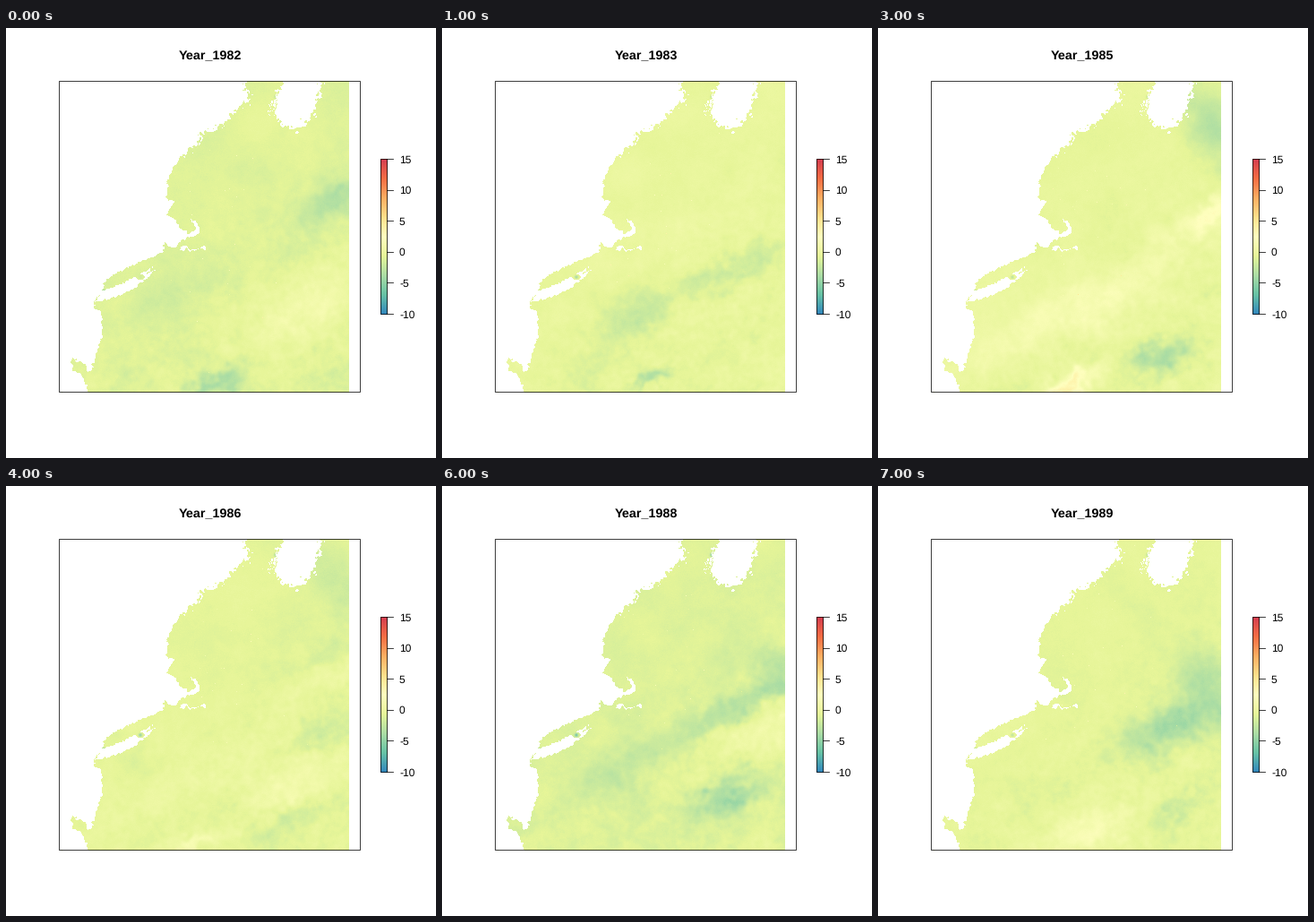
Recreate the animation shown at these times as a matplotlib script. Size 480x480 px, loop 8 s.

```python
import numpy as np
import matplotlib.pyplot as plt
from matplotlib.animation import FuncAnimation
from matplotlib.colors import LinearSegmentedColormap
from matplotlib.patches import Rectangle
from matplotlib.path import Path

plt.rcParams.update({"font.family": "Liberation Sans", "text.hinting": "none"})
PX = 0.72         # one pixel in points at 100 dpi
LINE = 0.75 * PX
X0, X1, Y0, Y1 = 59, 383, 59, 407
W, H = X1 - X0, Y1 - Y0
GX, GY = np.meshgrid(np.arange(X0, X1) + 0.5, np.arange(Y0, Y1) + 0.5)

CMAP = LinearSegmentedColormap.from_list("heat", [
    "#3288BD", "#66C2A5", "#ABDDA4", "#E6F598", "#FFFFBF",
    "#FEE08B", "#FDAE61", "#F46D43", "#D53E4F"], 256)
VMIN, VMAX = -10, 15
FIRST, COUNT = 1982, 8


def smooth(rng, scale):
    """Gaussian-filtered noise with unit deviation."""
    fy = np.fft.fftfreq(H)[:, None]
    fx = np.fft.rfftfreq(W)[None, :]
    gain = np.exp(-2 * (np.pi * scale) ** 2 * (fx ** 2 + fy ** 2))
    out = np.fft.irfft2(np.fft.rfft2(rng.normal(size=(H, W))) * gain, s=(H, W))
    return (out - out.mean()) / out.std()


# Key points of the shores; noise adds the ragged detail.
MAINLAND = [
    (50, 50), (262, 50), (270, 70), (270, 82), (240, 109), (222, 119),
    (193, 146), (181, 166), (179, 190), (188, 194), (179, 209), (188, 213),
    (194, 224), (204, 229), (213, 225), (205, 213), (214, 218), (217, 229),
    (197, 236), (188, 245), (176, 240), (175, 250), (140, 265), (112, 281),
    (107, 294), (98, 305), (98, 313), (107, 317), (107, 345), (95, 382),
    (91, 384), (88, 374), (73, 369), (74, 381), (86, 388), (92, 408),
    (50, 408)]
LONG_ISLE = [(99, 306), (107, 294), (130, 285), (163, 267), (156, 276),
             (167, 270), (143, 291), (126, 299)]
ISLANDS = [(193, 248), (198, 243), (206, 247), (213, 247), (222, 243),
           (222, 247), (207, 248)]
EAST = [(311, 50), (309, 60), (299, 88), (305, 106), (322, 115), (335, 104),
        (347, 88), (356, 50)]
NECK = [(293, 95), (303, 71), (304, 72), (295, 94)]
INLETS = [(150, 278), (109, 294), (301, 77)]


def sea_mask():
    rng = np.random.default_rng(4)
    rough = 0.7 + 1.8 / (1 + np.exp((GY - 150) / 8))
    pts = np.column_stack([(g + rough * smooth(rng, 1)).ravel()
                           for g in (GX, GY)])
    land = np.zeros(W * H, bool)
    for shore in (MAINLAND, LONG_ISLE, ISLANDS, EAST, NECK):
        land |= Path(shore).contains_points(pts)
    land = land.reshape(H, W)
    px, py = INLETS[0]
    return ~land | (np.hypot((GX - px) / 5, (GY - py) / 3) < 1)


SEA = sea_mask()
# Texture grows stronger away from the coast.
OFFSHORE = 0.3 + 1 / (1 + np.exp(-((GX - 260) * 0.6 + (GY - 240) * 0.8) / 30))
TILT = np.radians(25)  # the currents run up to the right

# Per year: base level, then main streaks (x, y, length, width, strength).
YEARS = {}
YEARS[1982] = -0.9, [(368, 190, 28, 13, -2.5), (335, 310, 55, 30, 1.8),
                     (225, 401, 26, 8, -3), (200, 290, 50, 20, -0.8)]
YEARS[1983] = -0.2, [(210, 317, 26, 15, -1.8), (315, 275, 52, 13, -1.9),
                     (237, 391, 18, 6, -3), (165, 383, 28, 18, -1.3)]
YEARS[1985] = -0.3, [(372, 108, 20, 36, -2.8), (368, 210, 28, 10, 3.2),
                     (225, 312, 95, 22, 1.8), (210, 401, 26, 8, 4),
                     (318, 368, 24, 12, -3.5)]
YEARS[1987] = -0.9, [(365, 195, 18, 26, -2), (355, 277, 30, 13, -3),
                     (325, 335, 46, 22, 3.2), (200, 303, 55, 20, -0.9)]
YEARS[1988] = -1.0, [(374, 205, 16, 15, -2.5), (325, 248, 55, 9, -2.2),
                     (195, 318, 42, 14, -1.4), (320, 348, 36, 12, -3),
                     (350, 275, 50, 18, 1.6)]
YEARS[1989] = -0.5, [(322, 275, 38, 15, -3.5), (370, 228, 24, 36, -2.9),
                     (240, 383, 42, 16, 2.2), (340, 355, 28, 7, -1.6)]


def pattern(year, x, y):
    base, streaks = YEARS[year]
    out = np.full_like(x, base)
    c, s = np.cos(TILT), np.sin(TILT)
    for sx, sy, length, width, strength in streaks:
        u = ((x - sx) * c - (y - sy) * s) / length
        v = ((x - sx) * s + (y - sy) * c) / width
        out += strength * np.exp(-(u * u + v * v) / 2)
    return out


def anomaly(year):
    rng = np.random.default_rng(year)
    x, y = (g + OFFSHORE * (3 * smooth(rng, 9) + 2 * smooth(rng, 2.5))
            for g in (GX, GY))
    # a year without its own pattern blends its neighbours
    parts = [year] if year in YEARS else [year - 1, year + 1]
    field = np.mean([pattern(p, x, y) for p in parts], axis=0)
    field += 0.15 * smooth(rng, 14) + 0.08 * rng.normal(size=(H, W))
    field += OFFSHORE * (0.15 * smooth(rng, 5) + 0.12 * smooth(rng, 2))
    for px, py in INLETS:
        near = np.exp(-((GX - px) ** 2 + (GY - py) ** 2) / 4)
        field -= rng.uniform(0, 6) * near
    # sparse warm pixels
    rows = np.clip(rng.normal(200, 60, 25) - Y0, 0, H - 1).astype(int)
    cols = np.clip(rng.normal(240, 30, 25) - X0, 0, W - 1).astype(int)
    field[rows, cols] += rng.uniform(1, 4, 25)
    return np.ma.masked_where(~SEA, field)


FIELDS = [anomaly(FIRST + i) for i in range(COUNT)]

fig = plt.figure(figsize=(4.8, 4.8), dpi=100, facecolor="white")
ax = fig.add_axes([0, 0, 1, 1])
ax.axis("off")


def image(data, left, right, top, bottom):
    return ax.imshow(data, cmap=CMAP, vmin=VMIN, vmax=VMAX, aspect="auto",
                     extent=(left, right, bottom, top),
                     interpolation="nearest")


def frame(left, top, right, bottom):
    ax.add_patch(Rectangle((left, top), right - left, bottom - top, fill=False,
                           ec="black", lw=LINE, joinstyle="miter",
                           snap=True, zorder=3))


sea = image(FIELDS[0], X0, X1, Y0, Y1)
frame(59, 59, 395, 406)

TOP, BOTTOM = 146, 319
image(np.linspace(VMAX, VMIN, 174)[:, None], 418, 426, TOP, BOTTOM + 1)
frame(418, TOP, 425, BOTTOM)
for value in range(VMIN, VMAX + 1, 5):
    y = BOTTOM - (value - VMIN) / (VMAX - VMIN) * (BOTTOM - TOP)
    ax.plot([425, 432], [y, y], color="black", lw=LINE, snap=True, zorder=3)
    ax.text(439, y + 4.5, str(value), fontsize=12 * PX, va="baseline")
title = ax.text(227.5, 35, "", fontsize=14.4 * PX, weight="bold",
                ha="center", va="baseline")
ax.set_xlim(0, 480)
ax.set_ylim(480, 0)


def update(i):
    sea.set_data(FIELDS[i])
    title.set_text(f"Year_{FIRST + i}")
    return sea, title


anim = FuncAnimation(fig, update, frames=COUNT, interval=1000,
                     repeat=True, repeat_delay=0)
plt.show()
```
